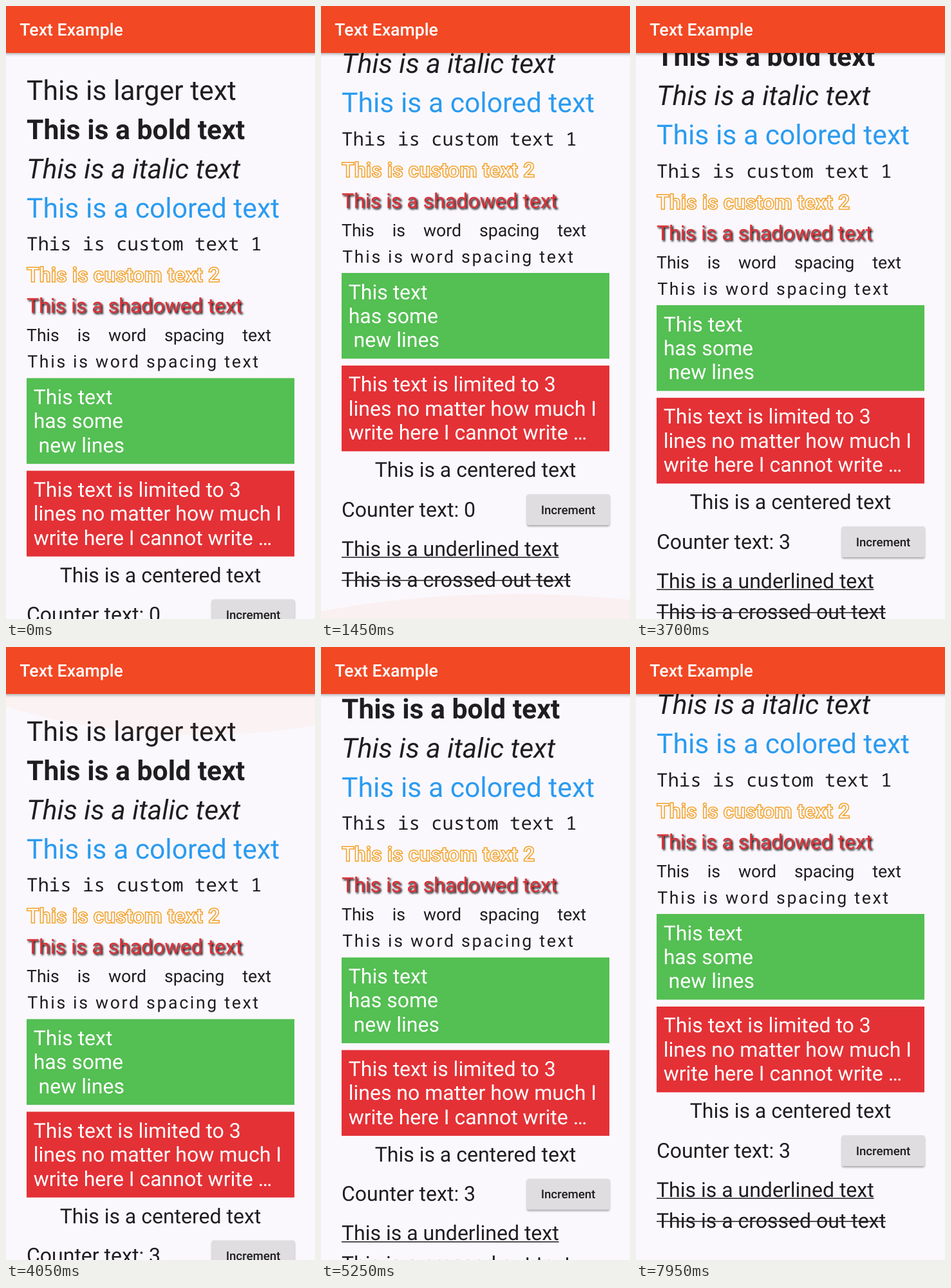
Animation, 480 px wide and 953 px high, one loop 8000 ms. Source, as an HTML page:

```html
<!DOCTYPE html>
<html lang="en">
<head>
<meta charset="utf-8">
<title>Text Example</title>
<style>
  html, body { margin: 0; width: 100%; height: 100%; overflow: hidden; background: #fbf8fd; }
  svg { display: block; width: 480px; height: 953px; }
  text { font: 400 32px Roboto, sans-serif; fill: #1f1d20; text-rendering: geometricPrecision; white-space: pre; }
  .large { font-size: 42.67px; }
  .bold { font-weight: 700; }
  .italic { font-style: italic; }
  .blue { fill: #2a9bf0; }
  .mono { font: 500 29px "Noto Sans Mono", monospace; }
  .outline { font-weight: 700; fill: none; stroke: #f3a024; stroke-width: 1.5px; }
  .shadowed { fill: #dc3038; filter: drop-shadow(2.67px 2.67px 1.5px #000); }
  .small { font-size: 26.67px; }
  .words { word-spacing: 21.33px; }
  .letters { letter-spacing: 2.67px; }
  .white { fill: #fff; }
  .line { fill: #1f1d20; }
  .title { font-size: 26.67px; font-weight: 500; fill: #fff; }
  .label { font-size: 18.67px; font-weight: 500; }
  .button { fill: #dfdde0; filter: drop-shadow(0 2px 1.6px rgba(0, 0, 0, .34)); }
  .bar { fill: #f24824; filter: drop-shadow(0 2px 2.2px rgba(0, 0, 0, .3)); }
  .glow { fill: #ee6820; }
</style>
</head>
<body>
<svg viewBox="0 0 480 953">
  <defs>
    <clipPath id="buttonShape"><rect x="320" y="922.5" width="128.3" height="48" rx="2.7"/></clipPath>
  </defs>
  <rect width="480" height="953" fill="#fbf8fd"/>
  <g id="page">
    <text class="large" x="32" y="145.7">This is larger text</text>
    <text class="large bold" x="32" y="206.5">This is a bold text</text>
    <text class="large italic" x="32" y="267.5">This is a italic text</text>
    <text class="large blue" x="32" y="328.5">This is a colored text</text>
    <text class="mono" x="32" y="380">This is custom text 1</text>
    <text class="outline" x="32" y="429">This is custom text 2</text>
    <text class="shadowed" x="32" y="477">This is a shadowed text</text>
    <text class="small words" x="32" y="521">This is word spacing text</text>
    <text class="small letters" x="33.3" y="562">This is word spacing text</text>

    <rect x="32" y="578.5" width="416" height="133.3" fill="#54bf53"/>
    <text class="white" x="42.7" y="619">This text</text>
    <text class="white" x="42.7" y="656.3">has some</text>
    <text class="white" x="50.6" y="693.7">new lines</text>

    <rect x="32" y="722.5" width="416" height="133.3" fill="#e43136"/>
    <text class="white" x="42.7" y="762.9">This text is limited to 3</text>
    <text class="white" x="42.7" y="800.2">lines no matter how much I</text>
    <text class="white" x="42.7" y="837.6">write here I cannot write …</text>

    <text x="240" y="895.8" text-anchor="middle">This is a centered text</text>
    <text id="counter" x="32" y="957">Counter text: 0</text>
    <rect class="button" x="320" y="922.5" width="128.3" height="48" rx="2.7"/>
    <circle id="ripple" cx="384" cy="946.5" opacity="0" clip-path="url(#buttonShape)"/>
    <text class="label" x="384" y="953" text-anchor="middle">Increment</text>
    <text x="32" y="1018.3">This is a underlined text</text>
    <rect class="line" x="32" y="1019.9" width="337.5" height="1.5"/>
    <text x="32" y="1066.3">This is a crossed out text</text>
    <rect class="line" x="32" y="1055.8" width="356" height="1.5"/>
  </g>
  <circle class="glow" id="topGlow" cx="302" cy="-623.5" r="720"/>
  <circle class="glow" id="bottomGlow" cx="302" cy="-623.5" r="720"/>
  <rect class="bar" x="-10" y="-10" width="500" height="83"/>
  <text class="title" x="21.3" y="46">Text Example</text>
</svg>
<script>
const LOOP = 8000;
const MAX_SCROLL = 163.5;
// [start, end, from, to]
const drags = [
  [702, 1101, 0, MAX_SCROLL],
  [3552, 3957, MAX_SCROLL, 0],
  [5000, 5450, 0, MAX_SCROLL]
];
const taps = [2150, 2750, 3100];
// [start, release]
const bottomPulls = [[1050, 1300], [5430, 5800]];
const topPulls = [[3920, 4200]];

const $ = id => document.getElementById(id);
const clamp = v => Math.min(1, Math.max(0, v));
const smooth = v => v * v * (3 - 2 * v);

function scrollAt(t) {
  let y = 0;
  for (const [start, end, from, to] of drags) {
    if (t >= start) y = from + (to - from) * smooth(clamp((t - start) / (end - start)));
  }
  return y;
}

// The glow swells quickly while pulled, then recedes over 600 ms.
function drawGlow(node, pulls, t, place) {
  let size = 0, alpha = 0;
  for (const [start, release] of pulls) {
    if (t < start || t > release + 600) continue;
    const pull = clamp((t - start) / (release - start));
    const left = (1 - clamp((t - release) / 600)) ** 2;
    size = 0.72 * (1 - (1 - pull) ** 4) * left;
    alpha = 0.088 * pull * left;
  }
  node.setAttribute("opacity", alpha);
  node.setAttribute("transform", place(size));
}

function drawRipple(t) {
  const tap = taps.find(at => t >= at - 80 && t < at + 220);
  const p = tap === undefined ? 1 : (t - tap + 80) / 300;
  $("ripple").setAttribute("r", 15 + 65 * Math.sqrt(p));
  $("ripple").setAttribute("opacity", 0.12 * (1 - p));
}

function draw() {
  const t = performance.now() % LOOP;
  $("page").setAttribute("transform", `translate(0 ${-scrollAt(t)})`);
  $("counter").textContent = "Counter text: " + taps.filter(at => t >= at).length;
  drawRipple(t);
  drawGlow($("topGlow"), topPulls, t, s => `translate(0 73) scale(1 ${s})`);
  drawGlow($("bottomGlow"), bottomPulls, t, s => `translate(0 953) scale(1 ${-s})`);
  requestAnimationFrame(draw);
}
draw();
</script>
</body>
</html>
```
